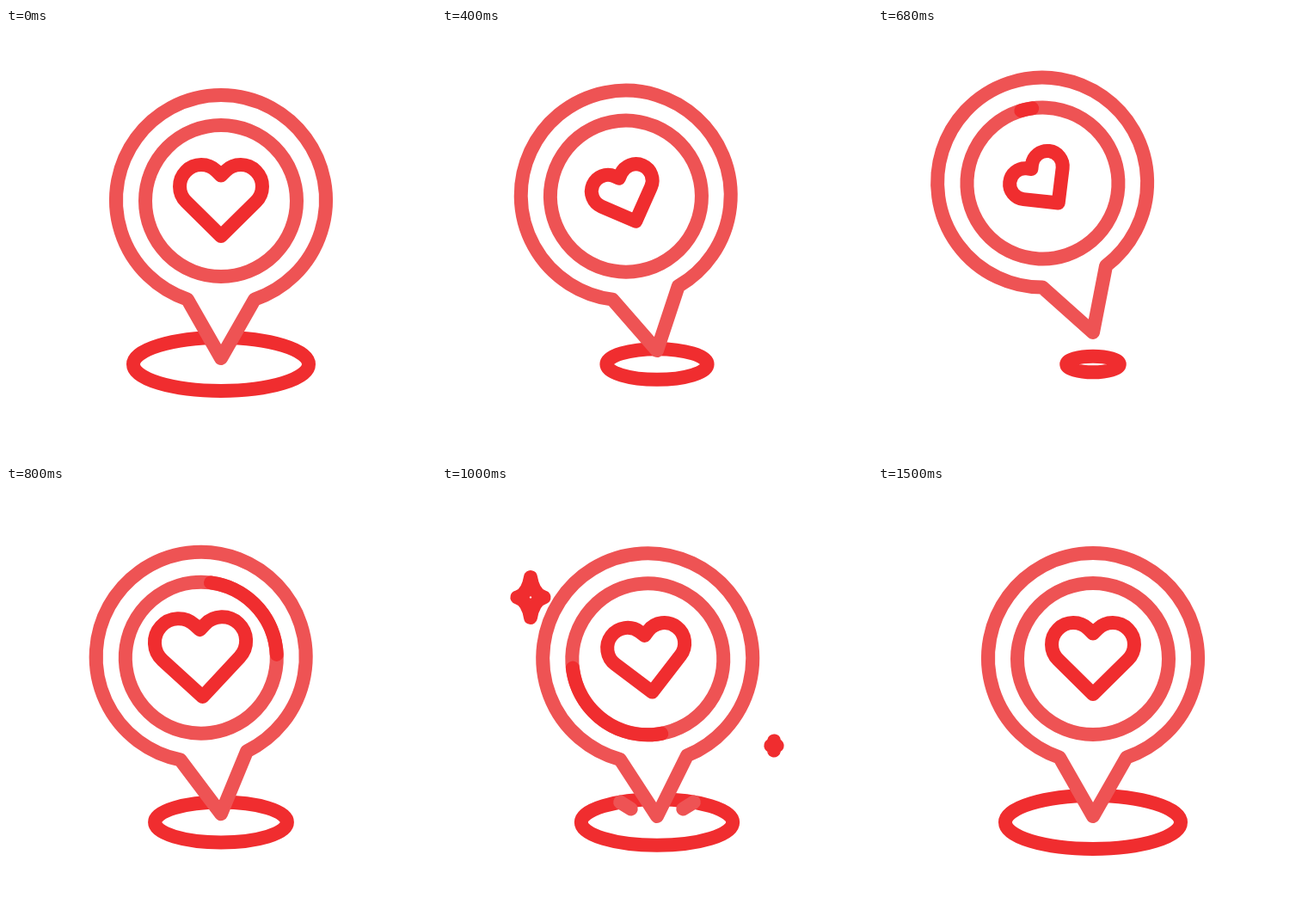
Write an HTML page without scripts that moves like this. It is 500 by 500 pixels and loops after 2500 ms.

```html
<!DOCTYPE html>
<html lang="en">
<head>
<meta charset="utf-8">
<title>Heart pin</title>
<style>
  html, body { margin: 0; width: 100%; height: 100%; overflow: hidden; background: #fff; }
  svg { display: block; width: 100%; height: 100%; }

  .line {
    fill: none;
    stroke-width: 16;
    stroke-linecap: round;
    stroke-linejoin: round;
    vector-effect: non-scaling-stroke;
  }
  .light { stroke: #ee5354; }
  .dark { stroke: #f02d2f; }

  .move { animation: 2500ms cubic-bezier(.33, 0, .67, 1) infinite; }
  .shadow { transform-origin: 250px 391px; animation-name: shadow; }
  .pin { transform-origin: 250px 384px; animation-name: lift, tilt; }
  .body { fill: #fff; }
  .heart { transform-origin: 250px 201px; animation-name: heart-size, heart-turn; }
  .star-a { animation-name: star-a; }
  .star-b { animation-name: star-b; }
  .sweep { visibility: hidden; animation: sweep 2500ms linear infinite, sweep-show 2500ms step-end infinite; }
  .tick { visibility: hidden; animation: tick 2500ms ease-out infinite, tick-show 2500ms step-end infinite; }
  .show-a { visibility: hidden; animation: show-a 2500ms step-end infinite; }
  .show-b { visibility: hidden; animation: show-b 2500ms step-end infinite; }

  @keyframes shadow {
    0% { scale: 1; }
    28% { scale: .3; }
    35.6% { scale: 1.13; }
    40.4% { scale: .86; }
    46.4%, 100% { scale: 1; }
  }
  @keyframes lift {
    0%, 11.2% { translate: 0 0; }
    25.6% { translate: 0 -34px; }
    33.4%, 100% { translate: 0 0; }
  }
  @keyframes tilt {
    0% { rotate: 0deg; }
    28% { rotate: -18.7deg; }
    36% { rotate: 3.8deg; }
    40.4% { rotate: -3.5deg; }
    46.4% { rotate: .3deg; }
    49.6%, 100% { rotate: 0deg; }
  }
  @keyframes heart-size {
    0% { scale: 1; }
    24%, 26% { scale: .68; }
    33.2% { scale: 1.14; }
    39.4% { scale: .94; }
    46%, 100% { scale: 1; }
  }
  @keyframes heart-turn {
    0%, 6.4% { rotate: 0deg; }
    26.4% { rotate: -21deg; }
    32.8% { rotate: 6deg; }
    40% { rotate: -4.3deg; }
    50%, 100% { rotate: 0deg; }
  }
  @keyframes sweep {
    0%, 25% { stroke-dasharray: .1 720; stroke-dashoffset: 0; }
    27.2% { stroke-dasharray: 8 720; stroke-dashoffset: -2; }
    32% { stroke-dasharray: 80 720; stroke-dashoffset: -14; }
    36% { stroke-dasharray: 102 720; stroke-dashoffset: -80; }
    40% { stroke-dasharray: 94 720; stroke-dashoffset: -172; }
    43.6% { stroke-dasharray: 71 720; stroke-dashoffset: -246; }
    47.2% { stroke-dasharray: 48 720; stroke-dashoffset: -302; }
    50.4% { stroke-dasharray: 20 720; stroke-dashoffset: -339; }
    53.6%, 100% { stroke-dasharray: .1 720; stroke-dashoffset: -359.8; }
  }
  @keyframes sweep-show {
    25.6% { visibility: visible; }
    53.6% { visibility: hidden; }
  }
  @keyframes tick {
    0%, 35.2% { stroke-dasharray: .1 90; stroke-dashoffset: 0; }
    40% { stroke-dasharray: 15 90; stroke-dashoffset: -12; }
    47.2%, 100% { stroke-dasharray: .1 90; stroke-dashoffset: -30; }
  }
  @keyframes tick-show {
    35.2% { visibility: visible; }
    48% { visibility: hidden; }
  }
  @keyframes star-a {
    0%, 34.4% { scale: .02; }
    45% { scale: 1; }
    54.4%, 100% { scale: .02; }
  }
  @keyframes show-a {
    34.4% { visibility: visible; }
    54.4% { visibility: hidden; }
  }
  @keyframes star-b {
    0%, 37% { scale: .02; }
    51.6% { scale: 1; }
    60%, 100% { scale: .02; }
  }
  @keyframes show-b {
    37% { visibility: visible; }
    59.6% { visibility: hidden; }
  }
</style>
</head>
<body>
<svg viewBox="0 0 500 500">
  <defs>
    <path id="star" d="M0-42Q6-6 28 0Q6 6 0 42Q-6 6-28 0Q-6-6 0-42Z" vector-effect="non-scaling-stroke"/>
  </defs>

  <ellipse class="line dark move shadow" cx="250" cy="391" rx="102" ry="31"/>
  <path class="line light tick" d="M230 382L204.5 366"/>
  <path class="line light tick" d="M270 382L295.5 366"/>

  <g class="move pin">
    <path class="line light body" d="M250 384L211 315.6A122 122 0 1 1 289 315.6Z"/>
    <circle class="line light" cx="250" cy="201" r="88"/>
    <path class="line dark sweep" pathLength="360" d="M250 113A88 88 0 0 1 250 289A88 88 0 0 1 250 113"/>
    <path class="line dark move heart" d="M250 242L209.5 202A25 25 0 0 1 244.7 166.3L250 171.6L255.3 166.3A25 25 0 0 1 290.5 202Z"/>
  </g>

  <g class="show-a" transform="translate(103 129.5)">
    <use class="line dark move star-a" href="#star"/>
  </g>
  <g class="show-b" transform="translate(386 302)">
    <use class="line dark move star-b" href="#star"/>
  </g>
</svg>
</body>
</html>
```
